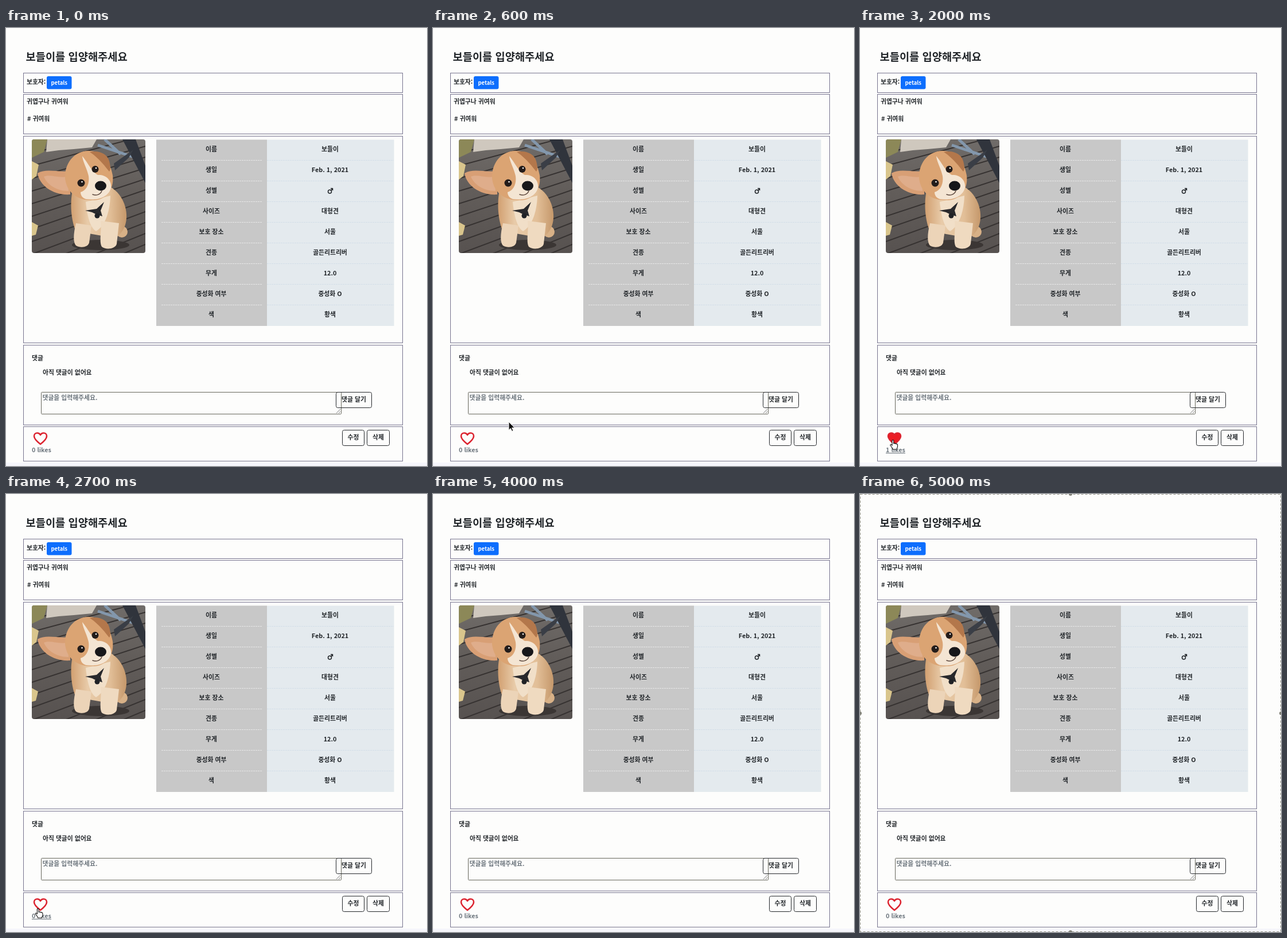
Animation, 734 px wide and 763 px high, one loop 5910 ms. Source, as an HTML page:

```html
<!DOCTYPE html>
<html lang="ko">
<head>
<meta charset="utf-8">
<style>
  html, body { margin: 0; width: 100%; height: 100%; overflow: hidden; background: #fdfdfc; }
  svg { display: block; }
  text { font: 900 10.8px "Noto Sans CJK KR", "Noto Sans CJK", "Noto Sans", sans-serif; fill: #212529; }
  .mid { text-anchor: middle; }
  .light { fill: #fff; }
  .muted { fill: #6c757d; }
  .box { fill: none; stroke: #77748f; shape-rendering: crispEdges; }
  .btn { fill: none; stroke: #25282c; }
  .line { fill: none; stroke-linecap: round; stroke-linejoin: round; }
</style>
</head>
<body>
<svg width="734" height="763" viewBox="0 0 734 763">
  <defs>
    <clipPath id="frame"><rect x="45" y="194" width="198" height="198" rx="4"/></clipPath>
    <linearGradient id="deck" x1="0" y1="0" x2="0" y2="1">
      <stop offset="0" stop-color="#706c69"/><stop offset=".45" stop-color="#625d5a"/><stop offset="1" stop-color="#575250"/>
    </linearGradient>
    <linearGradient id="fur" x1="0" y1="0" x2="1" y2="0">
      <stop offset="0" stop-color="#d2a071"/><stop offset=".3" stop-color="#e8cba9"/>
      <stop offset=".7" stop-color="#e2bf98"/><stop offset="1" stop-color="#c5986b"/>
    </linearGradient>
  </defs>

  <rect y="757" width="734" height="6" fill="#f6f6fb"/>
  <g id="page"></g>

  <g clip-path="url(#frame)">
    <rect x="45" y="194" width="198" height="198" fill="url(#deck)"/>
    <g id="planks" stroke="#363231" stroke-width="2"></g>
    <path d="M45 194H72L66 216 45 226Z" fill="#8c8858"/>
    <path d="M72 194H158L150 208 118 211 92 213 70 216Z" fill="#cfc8be"/>
    <path d="M45 232 57 238 53 258 45 264ZM45 338 56 344 52 360 45 362Z" fill="#d9c58c"/>
    <path d="M160 204 232 228M172 194 200 220" stroke="#8397ac" stroke-width="5"/>
    <path d="M203 194H226L243 240V270Z" fill="#30343c"/>
    <path d="M188 236 222 212 214 226 190 248Z" fill="#3a3e46"/>
    <ellipse cx="165" cy="378" rx="50" ry="9" fill="#3b3634"/>
    <ellipse cx="202" cy="355" rx="10" ry="10" fill="#d8b187"/>
    <path d="M116 283C110 312 116 342 122 354L190 366C207 356 214 335 208 312 204 296 193 282 180 276Z" fill="url(#fur)"/>
    <path d="M139 303C142 330 147 348 157 354 171 346 181 324 182 292Z" fill="#f1dfc8"/>
    <path d="M122 340C117 360 117 374 122 379 130 384 143 382 145 374L149 344Z" fill="#ecd4b8"/>
    <path d="M165 336C167 354 162 372 167 381 174 387 191 385 193 376L197 340Z" fill="#efdac0"/>
    <path d="M112 249C90 252 70 244 55 253 58 274 82 292 112 290Z" fill="#d89f75"/>
    <path d="M108 259C90 262 76 254 66 259 72 273 88 284 109 284Z" fill="#dfad8b"/>
    <path d="M103 262C102 236 118 215 143 214 166 213 182 231 186 257 189 283 173 301 149 300 126 300 106 288 103 262Z" fill="#dba473"/>
    <path d="M133 223C143 235 150 251 160 256 174 255 185 265 183 279 178 296 158 301 139 298 133 296 130 291 130 286 140 283 146 272 144 258 141 244 134 234 133 223Z" fill="#f4e5d3"/>
    <path d="M146 216C161 212 177 219 180 232 183 243 182 248 180 250 174 243 164 228 146 216Z" fill="#b3774b"/>
    <circle cx="131" cy="270" r="6.5" fill="#231c1a"/><circle cx="155.5" cy="246" r="6" fill="#231c1a"/>
    <circle cx="132.5" cy="268" r="1.3" fill="#fff"/><circle cx="157" cy="244" r="1.3" fill="#fff"/>
    <ellipse cx="165" cy="275" rx="10" ry="8.5" fill="#17171a"/>
    <path class="line" d="M167 284C164 291 157 292 151 290" stroke="#59443a" stroke-width="1.5"/>
    <path d="M138 318 158 315 171 303 165 318 168 328 158 325 150 321Z" fill="#29292c"/>
    <circle cx="159" cy="327" r="4.5" fill="#202226"/>
  </g>

  <path id="heart" stroke="#dc2430" stroke-width="2.6" stroke-linejoin="round"
    d="M60 725C53 719.5 49 715.5 49 711 49 707.5 51.5 705.5 54.5 705.5 57 705.5 59 707 60 709 61 707 63 705.5 65.5 705.5 68.5 705.5 71 707.5 71 711 71 715.5 67 719.5 60 725Z"/>
  <text id="likes" class="muted" x="45" y="739"></text>

  <g id="border" fill="#83837a">
    <rect x=".5" y=".5" width="733" height="762" fill="none" stroke="#96968a" stroke-dasharray="4 3"/>
    <circle cx="367" r="3"/><circle cx="367" cy="763" r="3"/>
    <circle cy="382" r="3"/><circle cx="734" cy="382" r="3"/>
  </g>

  <g id="cursor" stroke-linejoin="round">
    <path id="arrow" d="M0 0V14.5L3.3 11.5 5.7 16.5 8 15.5 5.7 10.6H10.4Z" fill="#111" stroke="#fff"/>
    <path id="hand" d="M-1 1C-1 -.7 1.7 -.7 1.7 1V6C2.5 5 4 5.2 4.2 6.3 5 5.5 6.3 5.8 6.5 6.9 7.3 6.3 8.5 6.8 8.5 8V11C8.5 13 7 14 7 16H.2C0 13.5 -2.5 11.5 -4 9.3 -4.8 7.8 -3 7 -2 8L-1 9.2Z" fill="#fff" stroke="#111" stroke-width="1.1"/>
  </g>
</svg>
<script>
const $ = id => document.getElementById(id);
const parts = [];
const rect = (l, t, r, b, attrs) =>
  parts.push(`<rect x="${l}" y="${t}" width="${r - l}" height="${b - t}" ${attrs}/>`);
const text = (x, cy, str, attrs = '', size = 10.8) =>
  parts.push(`<text x="${x}" y="${cy + size * .37}" style="font-size:${size}px" ${attrs}>${str}</text>`);
const hline = (x1, x2, y, color) =>
  parts.push(`<path d="M${x1} ${y}H${x2}" stroke="${color}" stroke-dasharray="3 1"/>`);
const button = (l, t, r, b, label) => {
  rect(l + .5, t + .5, r + .5, b + .5, 'class="btn" rx="3"');
  text((l + r + 1) / 2, (t + b) / 2 - .5, label, 'class="mid"');
};

// Page sections
for (const [top, bottom] of [[78, 112], [115, 184], [188, 548], [552, 691], [694, 754]])
  rect(30.5, top + .5, 691.5, bottom + .5, 'class="box"');
text(34.5, 50, '보들이를 입양해주세요', '', 18.7);
text(36, 94, '보호자:');
rect(71, 84, 114.5, 106.5, 'rx="3" fill="#0d6efd"');
text(92.7, 95, 'petals', 'class="mid light"', 9.5);
text(36, 128, '귀엽구나 귀여워');
text(37, 158, '# 귀여워');

// Details table
const rows = [['이름', '보들이'], ['생일', 'Feb. 1, 2021'], ['성별', ''], ['사이즈', '대형견'],
  ['보호 장소', '서울'], ['견종', '골든리트리버'], ['무게', '12.0'], ['중성화 여부', '중성화 O'], ['색', '황색']];
rect(262, 194.5, 455, 519, 'fill="#c8c8c8"');
rect(455, 194.5, 676.5, 519, 'fill="#e4eaee"');
rows.forEach(([label, value], i) => {
  const y = 211 + 36 * i;
  text(358, y, label, 'class="mid"');
  text(565, y, value, 'class="mid"');
  if (i < 8) {
    hline(271, 447, y + 19.5, '#e6e6e6');
    hline(455, 676, y + 19.5, '#d3dee8');
  }
});
parts.push('<g class="line" stroke="#212529" stroke-width="1.5"><circle cx="564.5" cy="285" r="3"/><path d="M566.5 283 569.5 279.5M566.5 279.5H569.5V282.5"/></g>');

// Comments and actions
text(45, 575, '댓글');
text(64, 600, '아직 댓글이 없어요');
rect(61.5, 634.5, 584.5, 672.5, 'fill="none" stroke="#66665c" rx="1"');
text(63.5, 644, '댓글을 입력해주세요.', 'class="muted"');
parts.push('<path d="M576 671 583 664M580 671 583 668" stroke="#777"/>');
button(575, 634, 637, 661, '댓글 달기');
button(586, 700, 624, 727, '수정');
button(629, 700, 668, 727, '삭제');
$('page').innerHTML = parts.join('');

$('planks').innerHTML = Array.from({ length: 13 }, (_, i) =>
  `<path d="M45 ${218 + i * 22}L243 ${168 + i * 19}"/>`).join('');

// Pointer path: time, x, y
const path = [[30, 430, 461], [600, 132, 686], [630, 132, 686], [1000, 57, 718], [2640, 57, 718], [2960, 40, 765]];
const ease = u => u * u * (3 - 2 * u);

function pointerAt(t) {
  const i = path.findIndex(p => p[0] > t);
  if (i < 1) return null;
  const [t0, x0, y0] = path[i - 1], [t1, x1, y1] = path[i];
  const u = ease((t - t0) / (t1 - t0));
  return [x0 + (x1 - x0) * u, y0 + (y1 - y0) * u];
}
const show = (id, on) => $(id).setAttribute('visibility', on ? 'visible' : 'hidden');

function draw(now) {
  const t = now % 5910;
  const pos = pointerAt(t);
  const hover = pos && pos[0] < 77 && pos[1] > 704 && pos[1] < 743;
  const liked = t >= 1530 && t < 2600;
  show('arrow', pos && !hover);
  show('hand', hover);
  if (pos) $('cursor').setAttribute('transform', `translate(${pos})`);
  $('heart').setAttribute('fill', liked ? '#ec1c24' : 'none');
  $('likes').textContent = `${+liked} likes`;
  $('likes').style.textDecoration = hover ? 'underline' : 'none';
  show('border', t >= 4430);
}

const start = performance.now();
(function tick() {
  draw(performance.now() - start);
  requestAnimationFrame(tick);
})();
</script>
</body>
</html>
```
